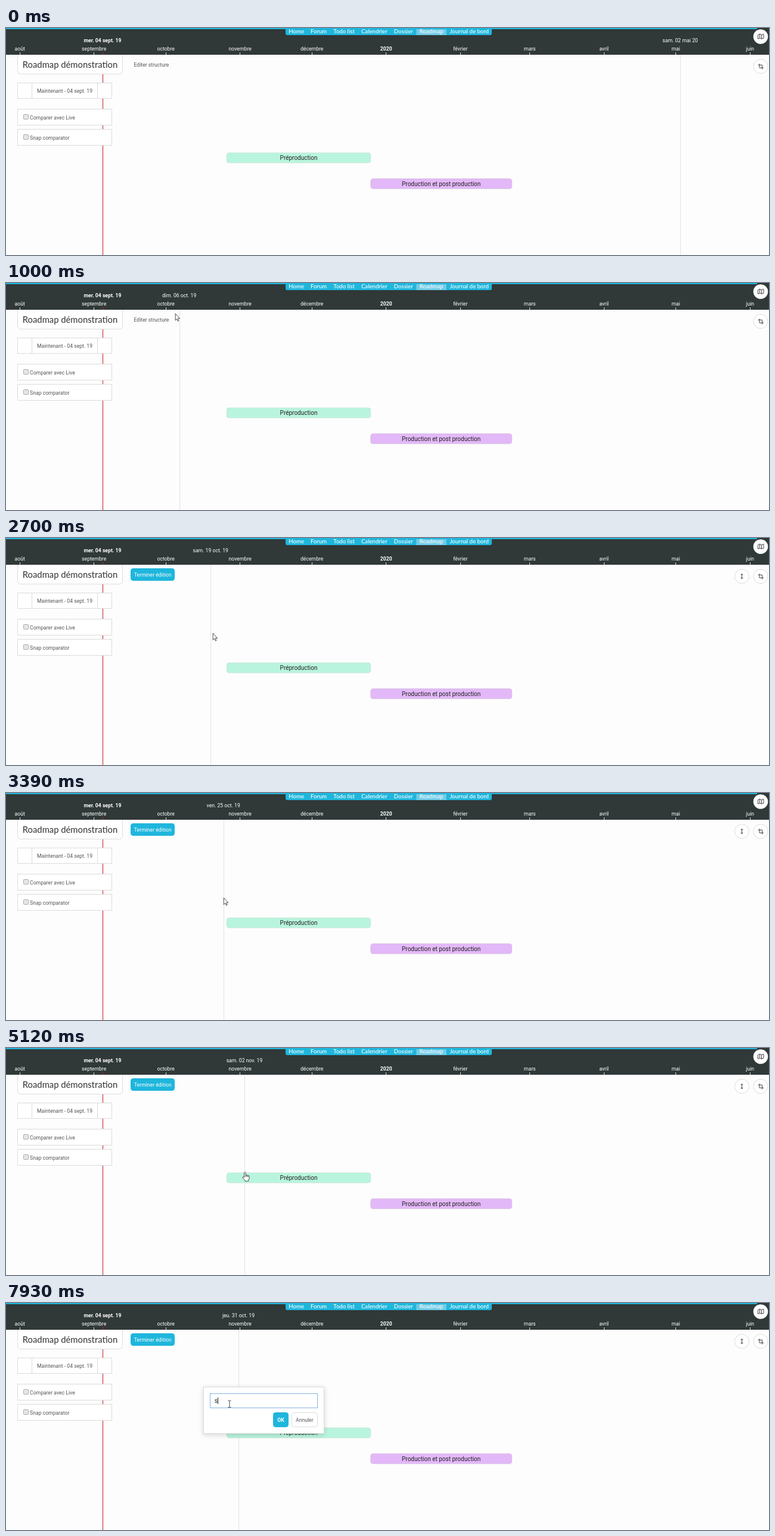
Recreate the animation shown at these times as an HTML page. Size 1280 by 382 pixels, loop 8 s.

```html
<!DOCTYPE html>
<html lang="fr">
<head>
<meta charset="utf-8">
<title>Roadmap</title>
<style>
html, body { margin: 0; width: 100%; height: 100%; overflow: hidden; background: #fdfdfd; }
svg { display: block; width: 100vw; height: 100vh; }
text { font: 8.667px Roboto, sans-serif; fill: #555; }
.mid { text-anchor: middle; }
.head text, text.white { fill: #fff; }
.bold { font-weight: 700; }
.nav text { font: 500 9.6px Lato, sans-serif; }
.title { font: 400 14.8px Lato, sans-serif; fill: #333; }
.bar, .field { font-size: 10px; fill: #222; }
.box { fill: #fff; stroke: #dcdcdc; }
.blue { fill: #1fb6dc; }
.icon { fill: none; stroke: #444; }
.cursor { fill: #fff; stroke: #222; stroke-width: .8; stroke-linejoin: round; }
</style>
</head>
<body>
<svg viewBox="0 0 1280 382">
  <defs>
    <filter id="shadow" x="-10%" y="-20%" width="120%" height="150%">
      <feDropShadow dx="0" dy="2" stdDeviation="4" flood-opacity=".16"/>
    </filter>
  </defs>
  <rect width="1280" height="382" fill="#fdfdfd"/>
  <rect id="line" y="45" width="1" height="337" fill="#e2e2e2"/>

  <g class="head">
    <rect width="1280" height="45" fill="#303838"/>
    <rect class="blue" width="1260" height="2"/>
    <g id="months"></g>
    <text id="date" class="mid" y="24"></text>
    <text class="mid bold" x="162" y="24">mer. 04 sept. 19</text>
    <g id="nav" class="nav">
      <path class="blue" d="M469 0H815V9a3 3 0 0 1-3 3H472a3 3 0 0 1-3-3Z"/>
    </g>
  </g>
  <rect x="162" y="40" width="1" height="342" fill="#c41e24"/>

  <path class="box" d="M19.5 45V72.5a5 5 0 0 0 5 5H190.500a5 5 0 0 0 5-5V45"/>
  <text class="title mid" x="107.500" y="67">Roadmap démonstration</text>
  <rect class="box" x="19.5" y="92.5" width="158" height="26"/>
  <path class="box" d="M43.5 92.5V118.500M153.5 92.5V118.500"/>
  <text class="mid" x="98.500" y="108.600">Maintenant - 04 sept. 19</text>
  <g id="options"></g>

  <rect id="edit" x="209.5" y="51.5" width="69" height="20" rx="4" fill="#fff" stroke="#6fcbe7"/>
  <text id="editText" x="214.500" y="64.500">Editer structure</text>
  <g id="done">
    <rect class="blue" x="209" y="51" width="74" height="21" rx="4.500"/>
    <text class="white mid" x="246.200" y="64.500" font-weight="500">Terminer édition</text>
    <circle class="box" cx="1234.500" cy="64.500" r="12"/>
    <path class="icon" d="M1234.500 60.500V68.500M1232.500 62.300l2-2 2 2M1232.500 66.700l2 2 2-2"/>
  </g>

  <circle cx="1266" cy="14.500" r="12.300" fill="#fff"/>
  <path class="icon" d="M1261.500 11.500l3-1.300 3 1.300 3.500-1.300V17l-3.500 1.300-3-1.300-3 1.300ZM1264.500 10.200V17M1267.500 11.500V18.300"/>
  <circle class="box" cx="1266" cy="64.500" r="12"/>
  <path class="icon" d="M1264 60V67H1271M1261.500 62.200H1268.500V69.500"/>

  <g id="bars"></g>

  <g id="popup">
    <rect class="box" x="331.500" y="141.500" width="202" height="78" filter="url(#shadow)"/>
    <rect x="342.500" y="152.500" width="180" height="24" fill="#fff" stroke="#86b4e3"/>
    <text id="hint" class="field" x="349.700" y="168" style="fill:#aaa">Titre du module</text>
    <text id="typed" class="field" x="349.700" y="168">s</text>
    <rect id="caret" y="159" width="1" height="11" fill="#222"/>
    <rect class="blue" x="448" y="184" width="26" height="25" rx="4.500"/>
    <text class="white mid bold" x="461" y="199.600">OK</text>
    <rect class="box" x="479.500" y="184.500" width="43" height="24" rx="4"/>
    <text class="mid" x="500.800" y="199.600">Annuler</text>
  </g>

  <g id="cursor">
    <path id="arrow" class="cursor" d="M.5 .5V11.800L3 9.400 4.700 13.200 6.300 12.500 4.700 8.700H8Z"/>
    <path id="hand" class="cursor" d="M-.400 9V1.200a1.200 1.200 0 0 1 2.400 0V5q1-.700 2 .2 1.200-.600 2 .5 2-.400 2 1.500V11L6.700 13V15H.8V13.500L-3.200 9.200q0-1.800 1.600-1.200ZM2 5V8M4 5.400V8M6 6V8"/>
    <path id="beam" class="icon" d="M-2.500-5.500H-.5L0-5 .5-5.500H2.500M0-5V5M-2.500 5.500H-.5L0 5 .5 5.500H2.500"/>
  </g>
</svg>
<script>
const LOOP = 8000, DAY_W = 4.0165, X0 = 23.2, DAY = 864e5;
const START = Date.UTC(2019, 7, 1);
const CLICK = 1940, POPUP = 6430, TYPE = 7930, BLINK = 530, LAG = 12;
const $ = id => document.getElementById(id);
const show = (id, on) => $(id).style.display = on ? '' : 'none';

function add(parent, tag, attrs, text) {
  const el = document.createElementNS('http://www.w3.org/2000/svg', tag);
  for (const k in attrs) el.setAttribute(k, attrs[k]);
  if (text) el.textContent = text;
  return $(parent).appendChild(el);
}

['août', 'septembre', 'octobre', 'novembre', 'décembre', '2020', 'février', 'mars', 'avril', 'mai', 'juin']
  .forEach((name, i) => {
    const x = X0 + (Date.UTC(2019, 7 + i, 1) - START) / DAY * DAY_W;
    add('months', 'text', { x, y: 37.6, class: name === '2020' ? 'mid bold' : 'mid' }, name);
    add('months', 'rect', { x: Math.floor(x), y: 41, width: 1, height: 4, fill: '#ddd' });
  });

// Menu entries share the free width as equal gaps
function layMenu(names, left, right) {
  const items = names.map(name => add('nav', 'text', { y: 9 }, name));
  const widths = items.map(el => el.getComputedTextLength());
  const gap = (right - left - widths.reduce((a, b) => a + b)) / (names.length - 1);
  let x = left;
  items.forEach((el, i) => {
    el.setAttribute('x', x);
    if (names[i] === 'Roadmap') {
      const tab = add('nav', 'rect', { x: x - gap / 2, y: 2, width: widths[i] + gap, height: 10, fill: '#6fcbe7' });
      el.before(tab);
    }
    x += widths[i] + gap;
  });
}
layMenu(['Home', 'Forum', 'Todo list', 'Calendrier', 'Dossier', 'Roadmap', 'Journal de bord'], 474.3, 810);

['Comparer avec Live', 'Snap comparator'].forEach((name, i) => {
  const y = 136.5 + i * 34;
  add('options', 'rect', { x: 19.5, y, width: 158, height: 27, class: 'box' });
  add('options', 'rect', { x: 29.5, y: y + 9, width: 8, height: 8, rx: 1, fill: '#e6e6e6', stroke: '#999', 'stroke-width': .8 });
  add('options', 'text', { x: 40, y: y + 17.5 }, name);
});

function addBar(name, x, y, width, fill, stroke) {
  add('bars', 'rect', { x, y, width, height: 17, rx: 4, fill, stroke, 'stroke-width': .67 });
  add('bars', 'text', { x: x + width / 2, y: y + 12, class: 'bar mid' }, name);
}
addBar('Préproduction', 370.3, 210, 241.4, '#b9f5de', '#c6ddd3');
addBar('Production et post production', 611.7, 253.6, 237, '#e3b8f8', '#d3bfdd');

// Mouse moves: start, end, destination
const MOVES = [
  [300, 1130, 258, 41], [1130, 1450, 240, 56], [1500, 1850, 246, 53], [2350, 2826, 360, 174],
  [3150, 3440, 365, 176], [3640, 3830, 373, 178], [3830, 4030, 365, 174], [4250, 4370, 365, 212],
  [4880, 5120, 400, 209], [5650, 5790, 390, 203], [6700, 7210, 375, 170]
];
const ease = u => u * u * u * (u * (6 * u - 15) + 10);

function pointer(t) {
  let x = 1131, y = 384;
  for (const [from, to, nx, ny] of MOVES) {
    const k = ease(Math.min(1, Math.max(0, (t - from) / (to - from))));
    x += (nx - x) * k;
    y += (ny - y) * k;
  }
  return [x, y];
}

const WEEK = ['dim.', 'lun.', 'mar.', 'mer.', 'jeu.', 'ven.', 'sam.'];
const MONTH = ['janv.', 'févr.', 'mars', 'avr.', 'mai', 'juin', 'juil.', 'août', 'sept.', 'oct.', 'nov.', 'déc.'];
function dateAt(x) {
  const d = new Date(START + Math.floor((x - X0) / DAY_W) * DAY);
  return `${WEEK[d.getUTCDay()]} ${String(d.getUTCDate()).padStart(2, '0')} ${MONTH[d.getUTCMonth()]} ${d.getUTCFullYear() % 100}`;
}

function draw(t) {
  const [x, y] = pointer(t);
  const [lineX] = pointer(Math.min(t - LAG, POPUP));
  $('line').setAttribute('x', Math.round(lineX));
  $('date').setAttribute('x', lineX);
  $('date').textContent = dateAt(lineX);

  const editing = t >= CLICK, open = t >= POPUP, typed = t >= TYPE;
  const onButton = x > 209 && x < 283 && y > 52 && y < 72;
  const onBar = x > 370 && x < 612 && y > 202 && y < 227 && t > CLICK && !open;
  show('edit', onButton && !editing);
  show('editText', !editing);
  show('done', editing);

  show('popup', open);
  $('popup').style.opacity = Math.min(1, (t - POPUP) / 200);
  show('hint', !typed);
  show('typed', typed);
  show('caret', typed || Math.floor((t - POPUP + 20) / BLINK) % 2 === 0);
  $('caret').setAttribute('x', typed ? 355 : 349);

  const beam = t >= 7130, hand = onButton || onBar;
  show('beam', beam);
  show('hand', hand && !beam);
  show('arrow', !beam && !hand);
  $('cursor').setAttribute('transform', `translate(${x} ${y})`);
}

const begin = performance.now();
function tick() {
  draw((performance.now() - begin) % LOOP);
  requestAnimationFrame(tick);
}
tick();
</script>
</body>
</html>
```
